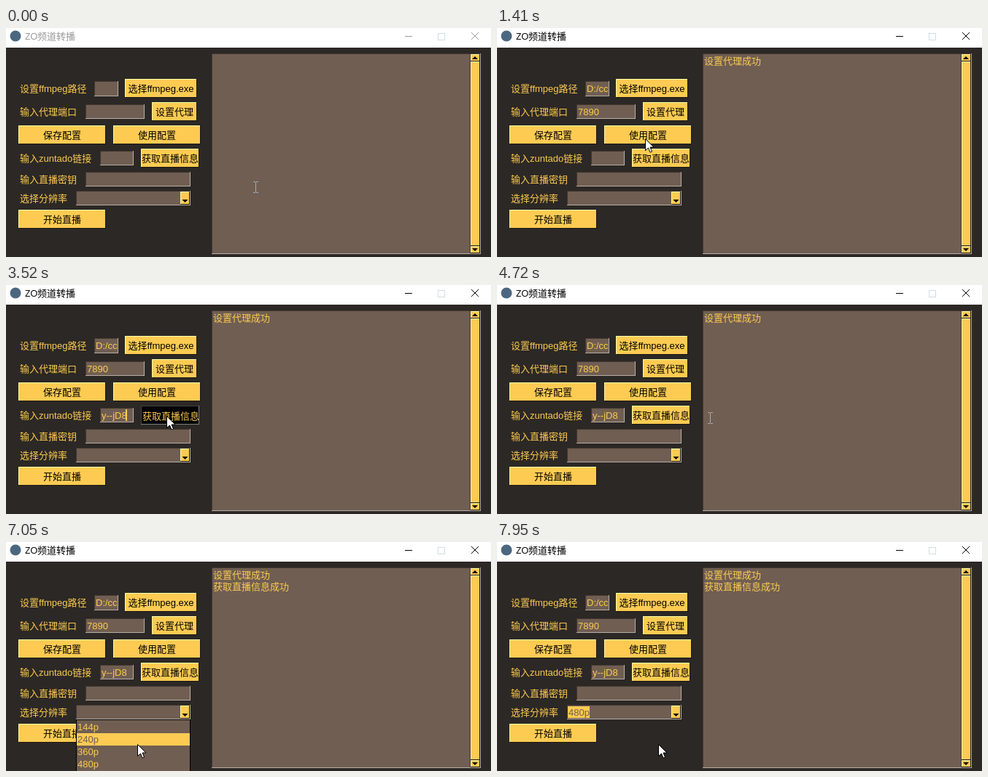
An HTML page with a canvas for the animation above (8000 ms loop, 665x315 px).

```html
<!DOCTYPE html>
<html lang="zh-CN">
<head>
<meta charset="utf-8">
<style>
html, body { margin: 0; width: 100%; height: 100%; overflow: hidden; background: #2c2825; }
canvas { display: block; }
</style>
</head>
<body>
<canvas id="stage" width="665" height="315"></canvas>
<script>
const ctx = document.getElementById('stage').getContext('2d');
const LOOP = 8000;
const BG = '#2c2825', FIELD = '#705e52', AMBER = '#fdcb52';
const FIELD_EDGE = ['#433831', '#b7aea8'];
const RAISED = ['#ffffa8', '#1a1613'];
const PRESSED = ['#404040', '#808080'];
const FONT = '13px "Liberation Sans", "Noto Sans CJK SC", "Noto Sans CJK", sans-serif';
const TITLE_FONT = '13px "Open Sans", "Noto Sans CJK SC", "Noto Sans CJK", sans-serif';

// Event times in ms
const USE_DOWN = 750, CONFIG = 880, FOCUS = 2220, PASTE = 2470;
const FETCH_DOWN = 3450, FETCH_UP = 3650, FETCHED = 5510;
const LIST_OPEN = 6580, LIST_CLOSE = 7400;
const BLINK_ON = 600, BLINK = 900;

const labels = [
  ['设置ffmpeg路径', 19, 88], ['输入代理端口', 19, 120], ['输入zuntado链接', 19, 184],
  ['输入直播密钥', 19, 213], ['选择分辨率', 19, 239]
];
const fields = {
  path: [121, 73, 33, 21], port: [109, 105, 81, 20], link: [129, 169, 46, 20],
  key: [109, 198, 144, 20], size: [96, 224, 157, 20]
};
const buttons = [
  ['选择ffmpeg.exe', 163, 70, 99, 26],
  ['设置代理', 200, 102, 62, 26],
  ['保存配置', 17, 134, 120, 26],
  ['使用配置', 147, 134, 120, 26, USE_DOWN, CONFIG],
  ['获取直播信息', 185, 166, 80, 26, FETCH_DOWN, FETCH_UP],
  ['开始直播', 17, 250, 120, 26]
];
const sizes = ['144p', '240p', '360p', '480p'];

// Pointer moves: first step, last step, step count, end x, end y
const moves = [
  [70, 680, 8, 203, 152], [1480, 1610, 2, 177, 170], [1870, 2070, 3, 168, 178],
  [2690, 3310, 8, 220, 180], [3980, 4190, 4, 292, 183], [6170, 6171, 1, 278, 189],
  [6240, 6380, 3, 246, 232], [6640, 7050, 6, 180, 278], [7120, 7330, 4, 183, 305],
  [7470, 7950, 7, 221, 278]
];

const during = (t, a, b) => t >= a && t < b;

function rect(x, y, w, h, color) {
  ctx.fillStyle = color;
  ctx.fillRect(x, y, w, h);
}

function box(x, y, w, h, fill, [lead, trail]) {
  rect(x, y, w, h, trail);
  rect(x, y, w - 1, h - 1, lead);
  rect(x + 1, y + 1, w - 2, h - 2, fill);
}

function text(s, x, y, color = AMBER, align = 'left', font = FONT) {
  ctx.font = font;
  ctx.textAlign = align;
  ctx.fillStyle = color;
  ctx.fillText(s, x, y);
}

function clipped([x, y, w, h], draw) {
  ctx.save();
  ctx.beginPath();
  ctx.rect(x + 1, y + 1, w - 2, h - 2);
  ctx.clip();
  draw();
  ctx.restore();
}

function poly(points, fill) {
  ctx.beginPath();
  points.forEach(([x, y]) => ctx.lineTo(x, y));
  ctx.closePath();
  ctx.fillStyle = fill;
  ctx.fill();
}

function line(x1, y1, x2, y2, color) {
  ctx.beginPath();
  ctx.moveTo(x1, y1);
  ctx.lineTo(x2, y2);
  ctx.strokeStyle = color;
  ctx.lineWidth = 1;
  ctx.stroke();
}

// dir: 1 points down, -1 points up
function triangle(cx, cy, dir) {
  poly([[cx - 4, cy - 2 * dir], [cx + 4, cy - 2 * dir], [cx, cy + 2 * dir]], '#000');
}

function titleBar(active) {
  const ink = active ? '#000' : '#999';
  rect(0, 0, 665, 27, '#fff');
  ctx.beginPath();
  ctx.arc(13, 11, 7.5, 0, 7);
  ctx.fillStyle = '#4b6780';
  ctx.fill();
  text('ZO', 26, 16, ink, 'left', TITLE_FONT);
  text('频道转播', 43, 16, ink, 'left', TITLE_FONT);
  rect(547, 11, 10, 1, ink);
  ctx.strokeStyle = '#cfdde4';
  ctx.lineWidth = 1;
  ctx.strokeRect(592.5, 7.5, 9, 9);
  line(638, 6, 648, 16, ink);
  line(648, 6, 638, 16, ink);
}

function drawButton(t, [name, x, y, w, h, down, up]) {
  const held = down !== undefined && during(t, down, up);
  box(x, y, w, h, held ? '#000' : AMBER, held ? PRESSED : RAISED);
  const shift = held ? 1 : 0;
  text(name, x + w / 2 + shift, y + 18 + shift, held ? AMBER : '#000', 'center');
}

function log(t) {
  box(282, 35, 355, 276, FIELD, FIELD_EDGE);
  if (t >= CONFIG) text('设置代理成功', 284, 50);
  if (t >= FETCHED) text('获取直播信息成功', 284, 66);
  box(636, 35, 15, 276, AMBER, FIELD_EDGE);
  box(637, 36, 13, 10, AMBER, RAISED);
  box(637, 46, 13, 254, AMBER, RAISED);
  box(637, 300, 13, 10, AMBER, RAISED);
  triangle(643, 41, -1);
  triangle(643, 305, 1);
}

function inputs(t) {
  Object.values(fields).forEach(f => box(...f, FIELD, FIELD_EDGE));
  box(239, 225, 13, 18, AMBER, RAISED);
  triangle(245.5, 238, 1);
  if (t >= CONFIG) {
    clipped(fields.path, () => text('D:/cc', 123, 88));
    text('7890', 111, 120);
  }
  if (t >= PASTE) text('y--jD8', 131, 184);
  if (during(t, FOCUS, LIST_OPEN) && (t - FOCUS) % BLINK < BLINK_ON) {
    rect(t < PASTE ? 130 : 164, 171, 2, 16, AMBER);
  }
  if (t >= LIST_CLOSE) {
    rect(97, 226, 30, 16, AMBER);
    text('480p', 98, 239, FIELD);
  }
}

function dropdown(pointerY) {
  rect(96, 244, 157, 71, '#000');
  rect(97, 245, 155, 70, FIELD);
  sizes.forEach((name, i) => {
    const y = 246 + 17 * i;
    const hot = during(pointerY, y, y + 17);
    if (hot) rect(97, y, 155, 17, AMBER);
    text(name, 98, y + 13, hot ? FIELD : AMBER);
  });
}

function pointerAt(t) {
  let x = 342, y = 219;
  for (const [start, end, n, tx, ty] of moves) {
    if (t < start) break;
    const step = Math.min(n, 1 + Math.floor((t - start) / (end - start) * (n - 1) + 1e-6));
    const p = step / n;
    x += (tx - x) * p;
    y += (ty - y) * p;
  }
  return [Math.round(x), Math.round(y)];
}

const inside = (x, y, [fx, fy, w, h]) => during(x, fx, fx + w) && during(y, fy, fy + h);

function pointer(x, y) {
  if (inside(x, y, [282, 35, 354, 276]) || inside(x, y, fields.link)) {
    const c = '#a4afb8';
    rect(x, y - 7, 1, 14, c);
    for (const row of [y - 8, y + 7]) {
      rect(x - 3, row, 3, 1, c);
      rect(x + 1, row, 3, 1, c);
    }
    return;
  }
  const shape = [[0, 0], [0, 16], [4, 12.5], [6.5, 18.5], [9, 17.5], [6.5, 11.5], [11.5, 11.5]]
    .map(([dx, dy]) => [x + dx + .5, y + dy + .5]);
  poly(shape, '#fff');
  ctx.strokeStyle = '#000';
  ctx.lineWidth = 1;
  ctx.stroke();
}

function draw(t) {
  const [px, py] = pointerAt(t);
  rect(0, 0, 665, 315, BG);
  titleBar(t >= USE_DOWN);
  labels.forEach(l => text(...l));
  log(t);
  inputs(t);
  buttons.forEach(b => drawButton(t, b));
  if (during(t, LIST_OPEN, LIST_CLOSE)) dropdown(py);
  pointer(px, py);
}

const origin = performance.now();
function tick() {
  draw((performance.now() - origin) % LOOP);
  requestAnimationFrame(tick);
}
tick();
</script>
</body>
</html>
```
